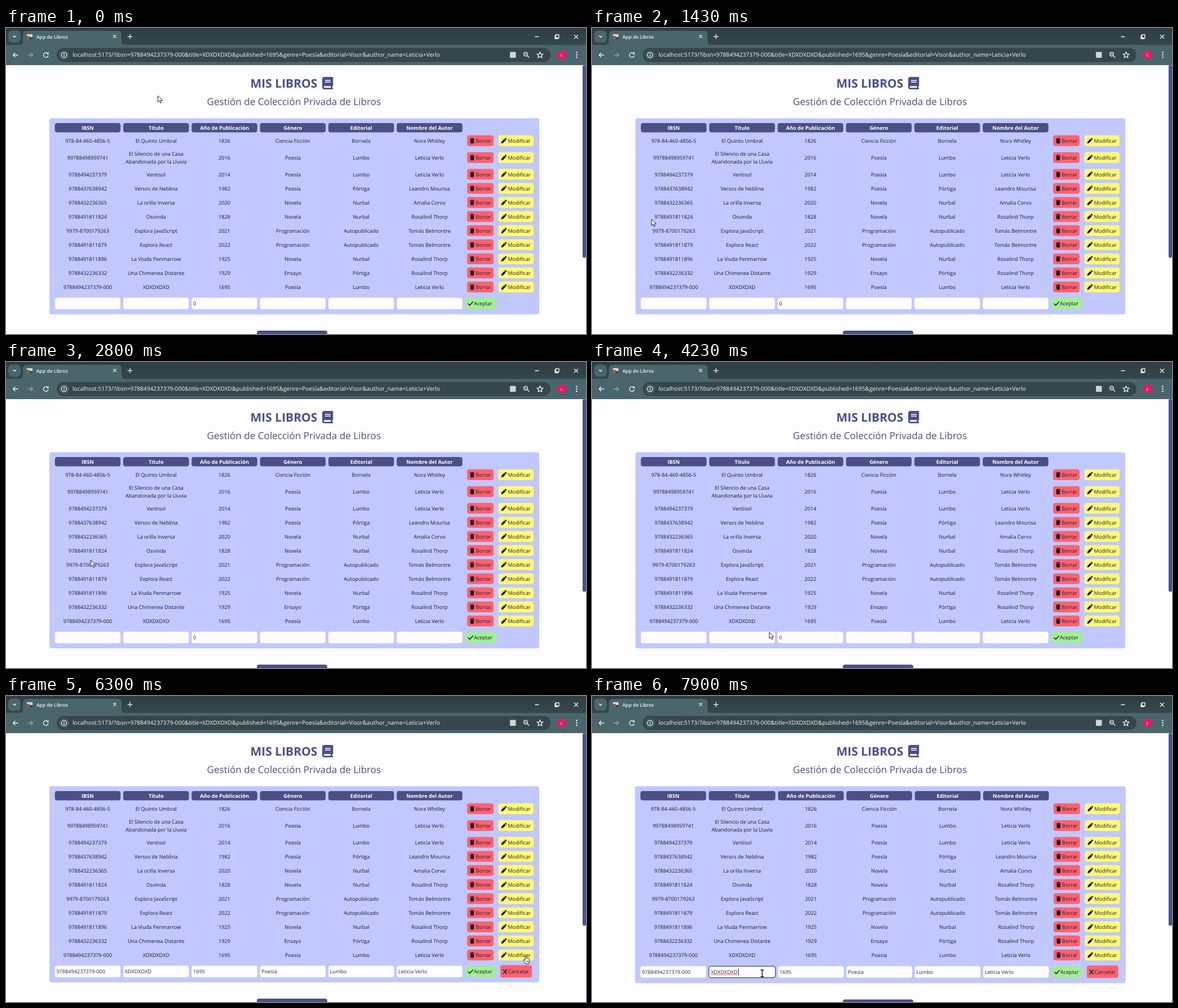
These frames come from a looping animation (1029x544 px, 8000 ms). An HTML page:

```html
<!DOCTYPE html>
<html lang="es">
<head>
<meta charset="utf-8">
<title>App de Libros</title>
<style>
  html, body { margin: 0; width: 100%; height: 100%; overflow: hidden; background: #fdfcff; }
  svg { display: block; }
  text { font: 9.15px "Open Sans", "Noto Sans", sans-serif; fill: #1b1c28; text-rendering: geometricPrecision; white-space: pre; }
  .mid { text-anchor: middle; }
  .head { font-weight: 700; font-size: 9.2px; fill: #fff; }
  .field { fill: #2c2c35; }
  .ui { fill: #f2f5f5; }
  .line { fill: none; stroke: #eef3f3; stroke-width: 1.3; }
  .navy { fill: #4a4f86; }
  .ink { fill: #15151c; }
  .stroke { fill: none; stroke: #15151c; stroke-width: 1.5; stroke-linecap: round; }
</style>
</head>
<body>
<svg id="stage" width="1029" height="544" viewBox="0 0 1029 544">
  <defs>
    <linearGradient id="strip" x2="0" y2="1">
      <stop stop-color="#2e3d41"/><stop offset="1" stop-color="#35484d"/>
    </linearGradient>
    <g id="trash" class="ink">
      <path d="M0 1.2h2.4L3 .2h2l.6 1H8v1.2H0z"/>
      <path d="M.6 3h6.8l-.4 6.2q-.1.8-.9.8H1.9q-.8 0-.9-.8z"/>
    </g>
    <g id="pencil" class="ink">
      <path d="M0 10l.7-3.3 4.9-4.9 2.6 2.6-4.9 4.9zM6.2 1.2L7.1.4q.6-.6 1.2 0l1.3 1.3q.6.6 0 1.2l-.8.9z"/>
    </g>
    <g id="arrow">
      <path d="M.5.5V11.6l2.6-2.4 1.9 4.1 1.8-.8-1.8-4h3.6z" fill="#fff" stroke="#111" stroke-width=".9"/>
    </g>
    <g id="hand">
      <path d="M-1.1 9V1.2q0-1.2 1.1-1.2t1.1 1.2v4q1.5-.8 2 .4 1.4-.6 1.9.5 1.7-.3 1.7 1.4v3.2q0 1.600-1 2.800v1.600H-.8v-1.500L-3.900 9.200q-.5-1.500 1-1.600z" fill="#fff" stroke="#111" stroke-width=".9"/>
      <path d="M1.200 9.500v3M3 9.500v3M4.800 9.500v3" stroke="#111" stroke-width=".7"/>
    </g>
    <g id="beam" fill="none" stroke="#111" stroke-width="1.400">
      <path d="M-3-6h2.200L0-5.400.8-6H3M0-5.400V5.400M-3 6h2.200L0 5.400.8 6H3"/>
    </g>
  </defs>

  <rect width="1029" height="544" fill="#fdfcff"/>

  <!-- browser window -->
  <rect width="1029" height="31" fill="url(#strip)"/>
  <rect y="30" width="1029" height="36" fill="#4a656b"/>
  <path d="M24 30q6 0 6-6V12q0-7 7-7h161q7 0 7 7v12q0 6 6 6z" fill="#4a656b"/>
  <rect x="4" y="4.500" width="22" height="21.500" rx="6.500" fill="#4a656b"/>
  <path class="line" d="M12.500 13.800l2.700 2.700 2.700-2.700M190.300 12.500l5 5m0-5l-5 5M215.500 15.300h9m-4.500-4.500v9"/>
  <g>
    <rect x="37" y="11" width="10" height="9" fill="#ddd6cb"/>
    <path d="M37 14h5v6h-5z" fill="#8d6251"/><path d="M42 16h5v4h-5z" fill="#394650"/>
  </g>
  <text class="ui" x="54" y="18.800" style="font-size:8.500px;font-weight:600">App de Libros</text>
  <path class="line" stroke-width="1" d="M938.500 15.500h7M1008 12l7 7m0-7l-7 7M975.500 13.500h-1.500v5.500h5.500v-1.500M975.500 12h5.500v5.500h-5.500z"/>
  <path class="line" d="M21.500 48h-9m4-4l-4 4 4 4M74 45.200a4.300 4.300 0 1 0 1 3.800M75 43.300v2.800h-2.800"/>
  <path class="line" style="stroke:#8ea3a7" d="M38.500 48h9m-4-4l4 4-4 4"/>
  <rect x="90" y="35.500" width="876" height="25" rx="12.500" fill="#35474c"/>
  <circle cx="103" cy="48" r="9" fill="#43585d"/>
  <circle class="line" cx="103" cy="48" r="4.700"/>
  <path class="line" d="M103 47.300v3.200M103 45.200v1.200"/>
  <text class="ui" x="118" y="51.400" style="font-size:10.200px">localhost:5173/?ibsn=9788494237379-000&amp;title=XDXDXDXD&amp;published=1695&amp;genre=Poesía&amp;editorial=Visor&amp;author_name=Leticia+Verlo</text>
  <rect x="894" y="42.500" width="10.500" height="10.500" rx="1" fill="#cdd6d8"/>
  <circle class="line" cx="922" cy="46.500" r="3.300"/>
  <path class="line" d="M924.500 49l3.800 3.800M920.500 46.500h3"/>
  <path class="line" stroke-linejoin="round" d="M947.500 42.500l1.500 3.700 4 .3-3.100 2.500 1 3.900-3.400-2.100-3.400 2.100 1-3.900-3.100-2.500 4-.3z"/>
  <circle cx="985.500" cy="47.800" r="7.800" fill="#ec1763"/>
  <text class="ui mid" x="985.500" y="50.500" style="font-size:8px">c</text>
  <g class="ui"><circle cx="1012.500" cy="43.500" r="1.300"/><circle cx="1012.500" cy="47.800" r="1.300"/><circle cx="1012.500" cy="52.100" r="1.300"/></g>

  <!-- page -->
  <rect class="navy" x="1023" y="66" width="6" height="342.500" rx="3"/>
  <text class="navy" x="433.500" y="106.300" style="font-size:21px;font-weight:700;fill:#4a4f86">MIS LIBROS</text>
  <path class="navy" fill-rule="evenodd" d="M565 87h14q1.300 0 1.300 1.300v13.600q0 1.200-1.300 1.400v2.900q1.300.2 1.300 1.400t-1.300 1.400h-14q-4 0-4-4V91q0-4 4-4zM565.200 103.300q-1.400 0-1.400 1.450t1.400 1.450h11.100v-2.900zM566 92.600v1.500h10v-1.500zM566 95.500v1.500h10v-1.500z"/>
  <text x="356.500" y="136.800" style="font-size:17.100px;fill:#4a4f86">Gestión de Colección Privada de Libros</text>
  <g id="table"></g>
  <use id="pointer"/>
</svg>
<script>
const $ = id => document.getElementById(id);
const LOOP = 8000, EDIT = 6300, FOCUS = 7500, SPELL = 7860;

const heads = ['IBSN', 'Título', 'Año de Publicación', 'Género', 'Editorial', 'Nombre del Autor'];
const books = `978-84-460-4856-5|El Quinto Umbral|1826|Ciencia Ficción|Bornela|Nora Whitley
99788498959741|El Silencio de una Casa/Abandonada por la Lluvia|2016|Poesía|Lumbo|Leticia Verlo
9788494237379|Ventisol|2014|Poesía|Lumbo|Leticia Verlo
9788437638942|Versos de Neblina|1982|Poesía|Pórtiga|Leandro Mourisa
9788432236365|La orilla Inversa|2020|Novela|Nurbal|Amalia Corvo
9788491811824|Osvinda|1828|Novela|Nurbal|Rosalind Thorp
9979-8700179263|Explora JavaScript|2021|Programación|Autopublicado|Tomás Belmontre
9788491811879|Explora React|2022|Programación|Autopublicado|Tomás Belmontre
9788491811896|La Viuda Penmarrow|1925|Novela|Nurbal|Rosalind Thorp
9788432236332|Una Chimenea Distante|1929|Ensayo|Pórtiga|Rosalind Thorp
9788494237379-000|XDXDXDXD|1695|Poesía|Lumbo|Leticia Verlo`.split('\n').map(r => r.split('|'));

const box = (x, y, w, h, fill, extra = '') =>
  `<rect x="${x}" y="${y}" width="${w}" height="${h}" rx="4" fill="${fill}" ${extra}/>`;
const label = (s, x, y, cls = '') => `<text x="${x}" y="${y}" class="${cls}">${s}</text>`;
const icon = (id, x, y) => `<use href="#${id}" x="${x}" y="${y}"/>`;
const rowY = i => i < 2 ? 200.3 + 30 * i : 260 + 25.05 * (i - 2);

// phase: 0 empty form, 1 editing, 2 title focused, 3 title spell-checked
function drawTable(phase) {
  const focus = phase > 1, d = focus ? .8 : 0;
  const colX = i => 86.7 + 121.3 * i + (i < 2 ? -d : d);
  const colW = i => 116.5 + (i === 1 ? 2 * d : 0);
  const midX = i => colX(i) + colW(i) / 2;
  const red = '#ff6270', navy = '#4a4f86';
  let out = box(77 - d, 160.5, 869 + 2 * d, 348.5 + 2 * d, '#c0c8ff');

  heads.forEach((h, i) => {
    out += box(colX(i), 169, colW(i), 16.5, navy) + label(h, midX(i), 180.8, 'mid head');
  });

  books.forEach((book, r) => {
    const y = rowY(r);
    book.forEach((cell, c) => {
      const lines = cell.split('/');
      lines.forEach((s, k) => {
        out += label(s, midX(c), y + 3.5 + 14 * (k - (lines.length - 1) / 2), 'mid');
      });
    });
    out += box(818 + d, y - 9.6, 47, 19.2, red) + icon('trash', 823 + d, y - 5) + label('Borrar', 833.3 + d, y + 3.5);
    out += box(873.5 + d, y - 9.6, 62.5, 19.2, '#fff978') + icon('pencil', 878.5 + d, y - 5) + label('Modificar', 890.5 + d, y + 3.5);
  });

  const y = 479.5 + d;
  const values = phase ? books[books.length - 1] : ['', '', '0', '', '', ''];
  values.forEach((s, i) => {
    const edge = focus && i === 1 ? 'stroke="#25252c" stroke-width="1"' : '';
    out += box(colX(i), y, colW(i), 20.5, '#fdfdff', edge) + label(s, colX(i) + (focus && i === 1 ? 3.7 : 2.7), y + 13.8, 'field');
  });
  out += box(815 + d, y, 53.5, 20.5, '#a2ee96')
    + `<path class="stroke" d="M${820 + d} ${y + 10.7}l2.800 2.800 5.500-6"/>` + label('Aceptar', 830 + d, y + 13.8);
  if (phase) {
    out += box(877 + d, y - 1, 56, 22, red)
      + `<path class="stroke" d="M${882.3 + d} ${y + 7}l6 7m0-7l-6 7"/>` + label('Cancelar', 890.7 + d, y + 13.8);
  }
  if (focus) out += `<path d="M259.800 484.500v12" stroke="#111"/>`;
  if (phase > 2) {
    out += `<path d="M211 496.300${'l1.500-1.600 1.500 1.600'.repeat(16)}" fill="none" stroke="#e33" stroke-width=".8"/>`;
  }
  $('table').innerHTML = out + box(445, 538 + 2 * d, 125, 30, navy);
}

// pointer stops: time, x, y
const track = [
  [0, 269, 120], [30, 269, 120], [200, 106, 339], [1430, 106, 339], [1530, 24, 405],
  [1560, 24, 405], [1800, 114, 399], [2660, 114, 399], [2800, 150, 352], [3160, 150, 352],
  [3200, 128, 380], [3660, 128, 380], [3730, 31, 485], [4229, 31, 485], [4230, 314, 480],
  [4259, 314, 480], [4260, 582, 464], [4760, 582, 464], [4800, 932, 464], [5260, 932, 464],
  [5300, 927, 456], [5760, 927, 456], [5880, 880, 485], [6000, 922, 461], [6730, 922, 461],
  [6860, 332, 474], [7360, 332, 474], [7400, 302, 493]
];

function pointerAt(t) {
  const i = track.findIndex(k => k[0] > t);
  if (i < 0) return track[track.length - 1].slice(1);
  const [a, b] = [track[i - 1], track[i]], p = (t - a[0]) / (b[0] - a[0]);
  return [a[1] + (b[1] - a[1]) * p, a[2] + (b[2] - a[2]) * p];
}

function shapeAt(x, y) {
  if (x > 873 && x < 936 && y > 451 && y < 471) return 'hand';
  if (x > 87 && x < 810 && y > 482 && y < 501) return 'beam';
  return 'arrow';
}

let shown = -1;
function tick(now) {
  const t = now % LOOP;
  const phase = (t >= EDIT) + (t >= FOCUS) + (t >= SPELL);
  if (phase !== shown) drawTable(shown = phase);
  const [x, y] = pointerAt(t), pointer = $('pointer');
  pointer.setAttribute('href', '#' + shapeAt(x, y));
  pointer.setAttribute('transform', `translate(${x} ${y})`);
  requestAnimationFrame(tick);
}
tick(performance.now());
</script>
</body>
</html>
```
